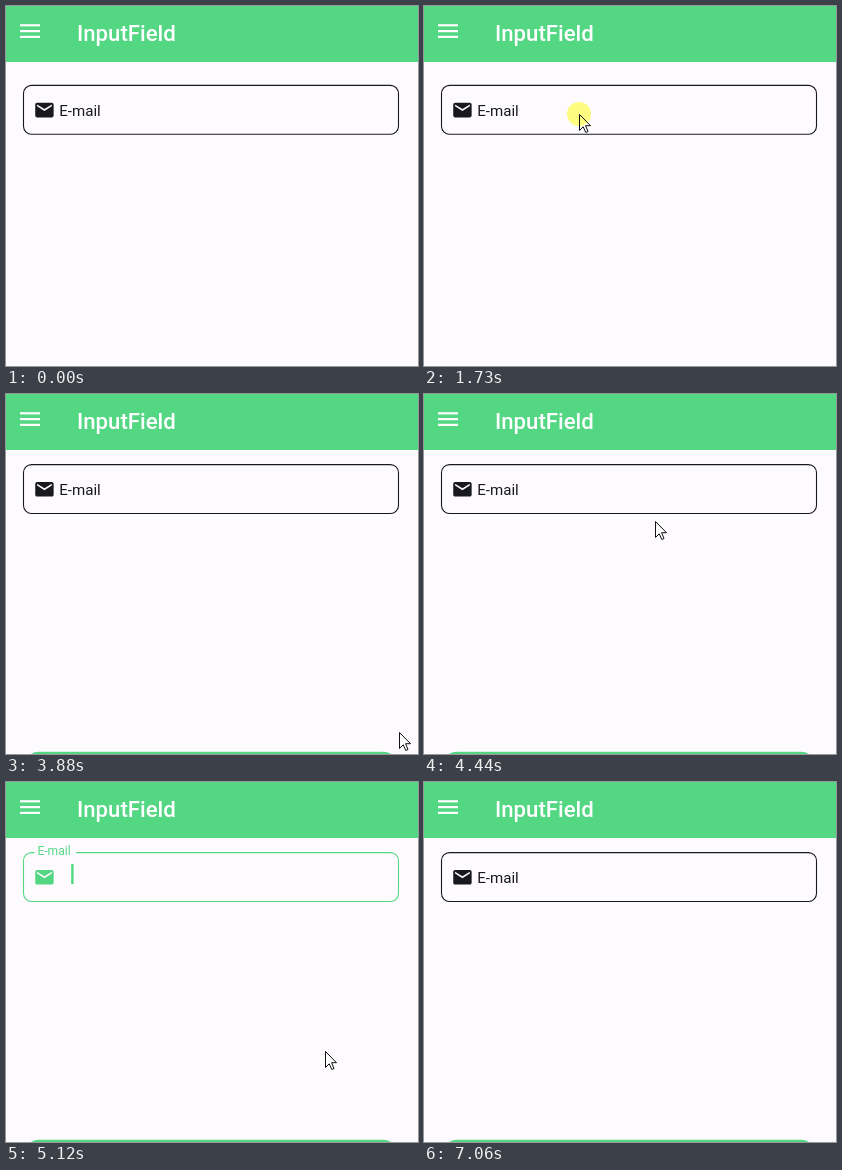
An HTML page with a canvas that plays this animation: 412x360 px, repeating every 7.59 s.

```html
<!DOCTYPE html>
<html lang="en">
<head>
<meta charset="utf-8">
<title>InputField</title>
<style>
  html, body { margin: 0; width: 100%; height: 100%; overflow: hidden; background: #fefbff; }
  canvas { display: block; }
</style>
</head>
<body>
<canvas id="stage" width="412" height="360"></canvas>
<script>
const ctx = document.getElementById('stage').getContext('2d');
const LOOP = 7590, FRAME = LOOP / 114;
const GREEN = '#53d783', INK = '#18181f', PAPER = '#fefbff';
const SHIFT = 8.8, SCROLL_AT = 3270;
const PRESS = 140, BLINK = 1000, CARET_ON = 475;

const mail = new Path2D('M20 4H4c-1.1 0-2 .9-2 2v12c0 1.1.9 2 2 2h16c1.1 0 2-.9 2-2V6' +
  'c0-1.1-.9-2-2-2zm0 4l-8 5-8-5V6l8 5 8-5v2z');
const arrow = new Path2D('M.5 .5V16.5L4.2 12.8L6.8 18.5L9 17.5L6.6 11.7H11.5Z');

// The pointer comes in along a curve, clicks the field and leaves; later the field loses focus.
const visits = [
  { enter: 550, arrive: 1140, focus: 1870, leave: 2250, gone: 2400, blur: 3270,
    from: [331, 341], bend: [200, 217], to: [155, 108], exit: [157, 381] },
  { enter: 3881, arrive: 4720, focus: 4930, leave: 5000, gone: 5240, blur: 6460,
    from: [393, 338], bend: [205, 159], to: [234, 98], exit: [373, 378] }
];

const clamp = v => Math.min(1, Math.max(0, v));
const mix = (a, b, k) => a + (b - a) * k;
const progress = (t, a, b) => clamp((t - a) / (b - a));
const within = (t, a, b) => t >= a && t < b;

function pointerAt(t) {
  if (within(t, 6800, 7060)) return [358, 354 - 4 * Math.sin(Math.PI * progress(t, 6800, 7060))];
  const v = visits.find(v => within(t, v.enter, v.gone));
  if (!v) return null;
  const u = 1 - (1 - progress(t, v.enter, v.arrive)) ** 1.6;
  const out = progress(t, v.leave, v.gone);
  return [0, 1].map(i => {
    const come = mix(mix(v.from[i], v.bend[i], u), mix(v.bend[i], v.to[i], u), u);
    return mix(come, v.exit[i], out);
  });
}

function text(str, x, y, size, weight, color) {
  ctx.font = `${weight} ${size}px Roboto, sans-serif`;
  ctx.fillStyle = color;
  ctx.fillText(str, x, y);
}

function pill(x, y, w, h, r) {
  ctx.beginPath();
  ctx.roundRect(x, y, w, h, r);
}

function drawHeader() {
  ctx.fillStyle = GREEN;
  ctx.fillRect(0, 0, 412, 56);
  ctx.fillStyle = '#fff';
  for (let i = 0; i < 3; i++) ctx.fillRect(14, 18.2 + 5.8 * i, 20, 2.2);
  text('InputField', 71, 34.5, 22.2, 500, '#fff');
}

function drawField(t) {
  const visit = visits.find(v => within(t, v.focus, v.blur));
  const color = visit ? GREEN : INK;
  const ramp = start => progress(t, start - 30, start + 60);
  const lift = visits.reduce((sum, v) => sum + ramp(v.focus) - ramp(v.blur), 0);

  ctx.strokeStyle = color;
  ctx.lineWidth = 1.1;
  pill(17.5, 79.4, 375, 48.9, 8);
  ctx.stroke();

  ctx.fillStyle = PAPER;
  ctx.fillRect(28.5, 77, 41.5 * lift, 5);
  text('E-mail', mix(53.2, 31.4, lift), mix(110.2, 82.2, lift), mix(15.1, 12.1, lift), 400, color);

  ctx.save();
  ctx.translate(27.4, 93);
  ctx.scale(0.92, 0.92);
  ctx.fillStyle = color;
  ctx.fill(mail);
  ctx.restore();

  if (visit && lift === 1 && (t - visit.focus) % BLINK < CARET_ON) {
    ctx.fillStyle = GREEN;
    ctx.fillRect(65.2, 90.7, 2.4, 20.3);
  }
}

function drawPointer(t) {
  const pos = pointerAt(t);
  if (!pos) return;
  ctx.save();
  ctx.translate(...pos.map(Math.round));
  ctx.fillStyle = '#fff';
  ctx.fill(arrow);
  ctx.strokeStyle = '#111';
  ctx.lineWidth = 1;
  ctx.stroke(arrow);
  if (visits.some(v => within(t, v.focus - PRESS, v.focus))) {
    ctx.globalCompositeOperation = 'multiply';
    ctx.fillStyle = '#ffff80';
    ctx.beginPath();
    ctx.arc(0, 0, 12, 0, Math.PI * 2);
    ctx.fill();
  }
  ctx.restore();
}

function draw(t) {
  ctx.fillStyle = PAPER;
  ctx.fillRect(0, 0, 412, 360);
  drawHeader();
  ctx.save();
  if (t >= SCROLL_AT) {
    ctx.translate(0, -SHIFT);
    ctx.fillStyle = GREEN;
    pill(17, 357.8 + SHIFT, 376, 44, 16);
    ctx.fill();
  }
  drawField(t);
  ctx.restore();
  drawPointer(t);
}

const start = performance.now();
function tick() {
  const t = (performance.now() - start) % LOOP;
  // Hold each pose for one frame; sample a little inside it.
  draw((Math.floor(t / FRAME + 0.15) + 0.3) * FRAME);
  requestAnimationFrame(tick);
}
tick();
</script>
</body>
</html>
```
